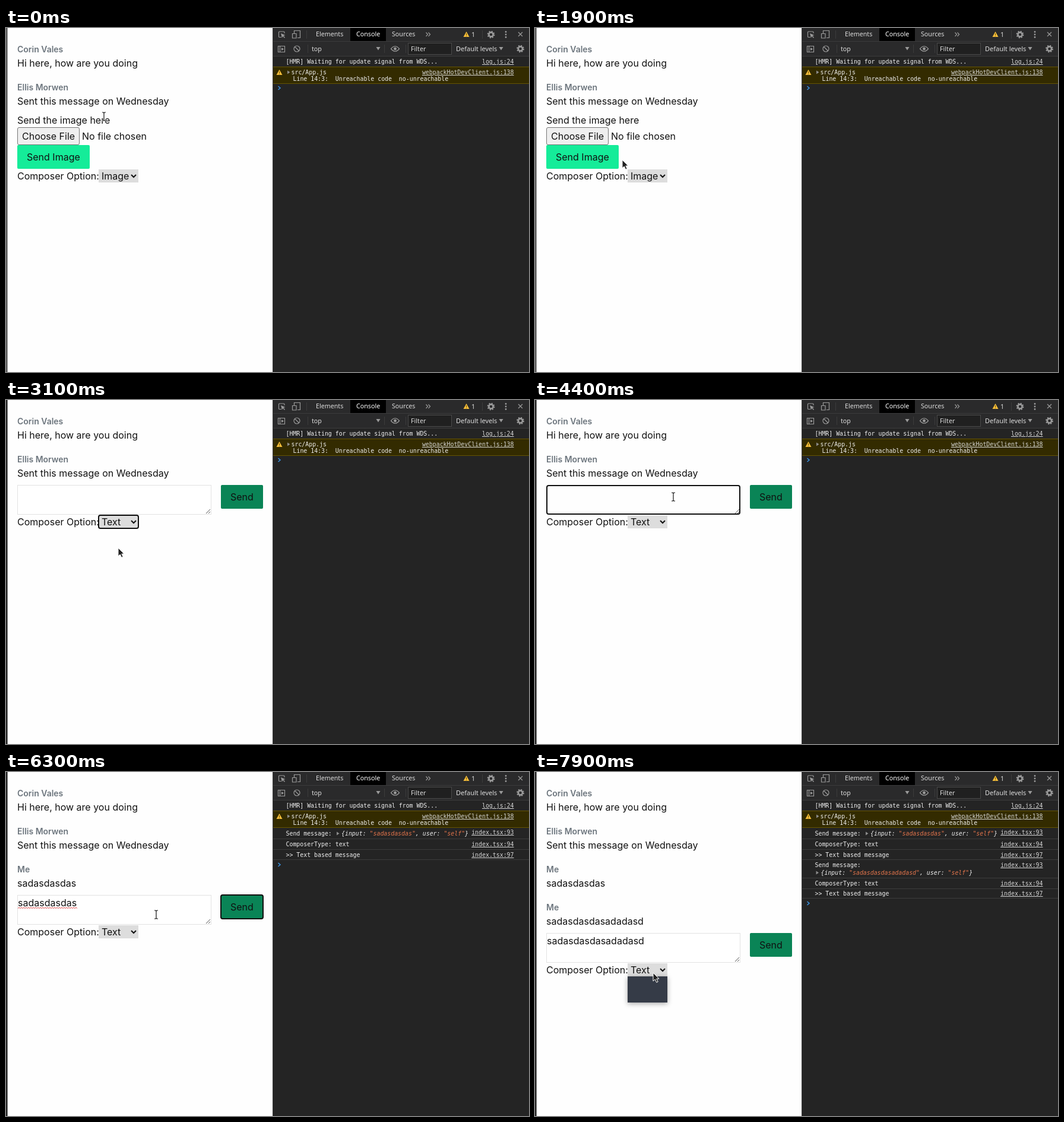
Animation of 881x579 px, one loop 8 s. Source, as an HTML page:

```html
<!DOCTYPE html>
<html lang="en">
<head>
<meta charset="utf-8">
<title>Message composer</title>
<style>
html, body { margin: 0; width: 100%; height: 100%; overflow: hidden; background: #fefefe; }
svg { display: block; }
text { white-space: pre; }
.app { font: 16px Inter, sans-serif; fill: #111; }
.name { font-size: 14px; font-weight: 600; fill: #6c757d; }
.ui { font: 10.7px "Noto Sans", sans-serif; fill: #dcdcdc; }
.log { font: 9.9px "DejaVu Sans Mono", monospace; fill: #efefef; }
.link { text-anchor: end; text-decoration: underline; fill: #d6d6d6; }
.obj { font-style: italic; }
.str { fill: #e2744b; }
.icon { fill: none; stroke: #9a9a9a; stroke-width: 1.2; }
.fill { fill: #9a9a9a; stroke: none; }
.rule { stroke: #3c3c3c; fill: none; }
.ring { fill: none; stroke: #101010; stroke-width: 2; }
</style>
</head>
<body>
<svg width="881" height="579" viewBox="0 0 881 579">
  <defs>
    <filter id="shadow" x="-50%" y="-50%" width="200%" height="200%">
      <feDropShadow dx="0" dy="2" stdDeviation="4" flood-opacity=".35"/>
    </filter>
    <g id="gear" class="icon">
      <circle r="3.6" stroke-width="2.6"/>
      <circle r="5.4" stroke-width="2" stroke-dasharray="2.12"/>
    </g>
    <g id="warn">
      <path d="M0-4.5L5 4.5H-5Z" fill="#f5bd3a"/>
      <path d="M0-1.5V1.5M0 2.5V3.5" stroke="#5a4500"/>
    </g>
    <path id="down" class="fill" d="M-3.5-2.5H3.5L0 3Z"/>
    <path id="right" d="M0-3L4.5 0L0 3Z" fill="#8c8c8c"/>
    <path id="arrow" d="M0 0V14L3.3 11L5.7 16.2L8.2 15L5.8 10H10Z" fill="#222" stroke="#fff"/>
    <g id="beam" fill="none">
      <path d="M-3-7H-1L0-6L1-7H3M0-6V6M-3 7H-1L0 6L1 7H3" stroke="#fff" stroke-width="2.6"/>
      <path d="M-3-7H-1L0-6L1-7H3M0-6V6M-3 7H-1L0 6L1 7H3" stroke="#111" stroke-width="1.2"/>
    </g>
    <path id="hand" stroke="#222" fill="#fff" stroke-linejoin="round"
      d="M-1.5 0.5Q0-1 1.5 0.5V6Q3 4.8 4.2 6.3Q5.8 5.4 6.8 7Q9 6.4 9 8.5V12.5L7.5 17H-1L-5 10.5Q-4.5 8.3-1.5 10.5Z"/>
  </defs>

  <rect x="449" width="432" height="579" fill="#242424"/>
  <rect x="450" width="431" height="47" fill="#2a2a2b"/>
  <rect x="580" width="60" height="22" fill="#000"/>
  <path class="rule" d="M449.5 0V579M450 22.5H881M450 47.5H881M506.5 4V18M802.5 4V18M508.5 28V42M637.5 28V42M673.5 28V42"/>
  <rect x="450" y="66" width="431" height="27" fill="#332b00"/>
  <path d="M450 65.5H881M450 93.5H881" stroke="#655300"/>

  <path class="icon" d="M464 15.5H460.5Q459.5 15.5 459.5 14.5V7Q459.5 6 460.5 6H468Q469 6 469 7V9"/>
  <path class="fill" d="M463 9L470.5 12L467.5 13L470 16L469 17L466.5 14L465 16.5Z"/>
  <path class="icon" d="M485.5 9V4.5H495.5V16.5H491M482.5 9.5H489V17H482.5Z"/>
  <path class="icon" d="M707.5 7.5L710.5 10.8L707.5 14M711.5 7.5L714.5 10.8L711.5 14"/>
  <path class="icon" stroke-width="1.5" d="M863 7L870 14M870 7L863 14"/>
  <g class="fill"><circle cx="842" cy="6.5" r="1.4"/><circle cx="842" cy="11" r="1.4"/><circle cx="842" cy="15.5" r="1.4"/></g>
  <path class="icon" d="M458.5 30.5H469.5V40.5H458.5ZM461.5 30V41"/>
  <path class="fill" d="M464 33L468 35.5L464 38Z"/>
  <path class="icon" stroke-width="1.5" d="M486.5 31.5L493.5 38.5M495 35A5 5 0 1 1 485 35A5 5 0 1 1 495 35"/>
  <path class="icon" d="M648.5 35Q655.5 26.5 662.5 35Q655.5 43.5 648.5 35Z"/>
  <circle class="fill" cx="655.5" cy="35" r="2.4"/>
  <rect x="677.5" y="25.5" width="73" height="19" fill="#202020" stroke="#4a4a4a"/>
  <use href="#gear" x="817" y="11"/><use href="#gear" x="866.5" y="35"/>
  <use href="#warn" x="775.5" y="10.5"/><use href="#warn" x="460.5" y="74.5"/>
  <use href="#down" x="627" y="34.5"/><use href="#down" x="834" y="34.5"/>
  <use href="#right" x="474" y="74.5"/>

  <g class="ui">
    <text x="522" y="14">Elements</text><text x="590" y="14" fill="#fff">Console</text>
    <text x="650" y="14">Sources</text><text x="784" y="15">1</text>
    <text x="515" y="39">top</text><text x="682" y="39">Filter</text>
    <text x="758" y="39" font-size="11">Default levels</text>
  </g>
  <g class="log">
    <text x="471.5" y="60">[HMR] Waiting for update signal from WDS...</text>
    <text class="link" x="855.5" y="60">log.js:24</text>
    <text x="480.5" y="78">src/App.js</text>
    <text class="link" x="855.5" y="78">webpackHotDevClient.js:138</text>
    <text x="483.5" y="89">Line 14:3:  Unreachable code  no-unreachable</text>
  </g>
  <g id="live"></g>
</svg>
<script>
const LOOP = 8000, STEP = 100;
const FIRST = "sadasdasdas", SECOND = FIRST + "adadasd";
const live = document.getElementById("live");

// pointer path: time, x, y
const path = [
  [0, 165, 149], [100, 165, 149], [200, 165, 150], [300, 165, 150],
  [800, 110, 178], [1200, 95, 214], [1500, 108, 188], [1900, 147, 222],
  [2200, 147, 222], [2500, 190, 249], [2700, 190, 249], [2900, 188, 271],
  [3100, 189, 249], [3600, 189, 249], [4200, 233, 163], [5000, 233, 163],
  [5200, 383, 167], [5400, 383, 167], [6300, 253, 240], [6700, 253, 240],
  [7000, 385, 232], [7200, 385, 232], [7800, 199, 338], [LOOP, 199, 338]
];

function pointer(t) {
  const i = path.findIndex(p => p[0] > t);
  const [t0, x0, y0] = path[i - 1], [t1, x1, y1] = path[i];
  const k = (t - t0) / (t1 - t0), e = k * k * (3 - 2 * k);
  return [x0 + (x1 - x0) * e, y0 + (y1 - y0) * e];
}

const during = (t, a, b) => t >= a && t < b;
const inside = ([px, py], x, y, w, h) => px >= x && px < x + w && py >= y && py < y + h;
const text = (x, y, s, cls = "") => `<text x="${x}" y="${y}" class="${cls}">${s}</text>`;
const rect = (x, y, w, h, attrs) => `<rect x="${x}" y="${y}" width="${w}" height="${h}" ${attrs}/>`;
const use = (id, x, y) => `<use href="#${id}" x="${x}" y="${y}"/>`;
const ring = (x, y, w, h) => rect(x, y, w, h, 'rx="3" class="ring"');
const link = (y, line) => text(855.5, y, "index.tsx:" + line, "link");
const rule = y => `<path class="rule" d="M450 ${y}.5H881"/>`;

function typed(t) {
  if (t < 6400) return FIRST.slice(0, Math.max(0, Math.floor((t - 4500) / 45)));
  return SECOND.slice(0, FIRST.length + Math.floor((t - 6400) / 55));
}

function object(x, y, input) {
  const str = s => `<tspan class="str">"${s}"</tspan>`;
  return use("right", x - 8, y - 3.5) +
    text(x, y, `{input: ${str(input)}, user: ${str("self")}}`, "obj");
}

// rows shared by both console entries, starting at the "ComposerType" baseline
function logTail(y, gap) {
  return text(471.5, y, "ComposerType: text") + link(y, 94) + rule(y + 5) +
    text(471.5, y + gap, "&gt;&gt; Text based message") + link(y + gap, 97) + rule(y + gap + 4);
}

function consoleLog(sent) {
  let s = "";
  if (sent > 0) s += text(471.5, 107, "Send message:") + object(565, 107, FIRST) + link(105, 93) + rule(112) + logTail(125, 18);
  if (sent > 1) s += text(471.5, 160, "Send message:") + link(160, 93) + object(481.5, 173, SECOND) + rule(178) + logTail(191, 17);
  const y = [101, 156, 221][sent];
  return `<g class="log">${s}</g><path d="M458.5 ${y - 3}L462 ${y}L458.5 ${y + 3}" fill="none" stroke="#3a95e8" stroke-width="1.5"/>`;
}

function messages(sent) {
  const list = [["Corin Vales", "Hi here, how are you doing"], ["Ellis Morwen", "Sent this message on Wednesday"],
    ["Me", FIRST], ["Me", SECOND]];
  return list.slice(0, 2 + sent).map(([who, body], i) =>
    text(19, 41 + 64 * i, who, "name") + text(19, 65 + 64 * i, body)).join("");
}

function imageForm(p) {
  const hover = inside(p, 19, 167, 105, 30);
  return text(19, 161, "Send the image here") +
    rect(19.5, 167.5, 104, 29, `rx="2.5" fill="${hover ? "#e2e2e2" : "#efefef"}" stroke="#767676"`) +
    text(27, 188, "Choose File") + text(128, 188, "No file chosen") +
    rect(19, 197, 122, 40, 'rx="2" fill="#15ec99"') + text(35, 223, "Send Image");
}

function textForm(t, y) {
  const writing = during(t, 4300, 5200) || during(t, 6400, 7100);
  const pressed = during(t, 5200, 6400) || during(t, 7100, 7800);
  let s = writing ? ring(20, y + 1, 325, 48)
    : rect(19.5, y + .5, 326, 49, 'fill="#fff" stroke="#e2e2e2"');
  s += `<path d="M337 ${y + 48}L344 ${y + 41}M341 ${y + 48}L344 ${y + 45}" stroke="#555"/>`;
  s += text(20, y + 19, typed(t));
  if (during(t, 5600, 6400))
    s += `<path d="M20 ${y + 22.5}${"l2-1.5 2 1.5".repeat(25)}" fill="none" stroke="#d33" stroke-width=".9"/>`;
  s += rect(362, y, 71, 40, 'rx="2" fill="#0a8456"') + text(378, y + 26, "Send");
  return s + (pressed ? ring(362, y, 71, 40) : "");
}

function select(t, y, value) {
  return text(19, y + 17, "Composer Option:") + rect(156, y, 67, 22, 'fill="#ddd"') +
    text(161, y + 17, value) +
    `<path d="M211 ${y + 9}l4 4 4-4" fill="none" stroke="#111" stroke-width="2"/>` +
    (during(t, 2900, 4300) ? ring(156, y, 67, 22) : "");
}

function popup(t, y, p) {
  let s = rect(156, y, 67, 44, 'fill="#353a47" filter="url(#shadow)"');
  if (t === 2500 || t >= 7900) return s;
  ["Text", "Image"].forEach((label, i) => {
    const top = y + 22 * i;
    const on = p[1] < y ? label === "Image" : inside(p, 156, top, 67, 22);
    if (on) s += rect(156, top, 67, 22, 'fill="#5294e2"');
    s += `<g fill="#e8eaee">${text(161, top + 17, label)}</g>`;
  });
  return s;
}

function cursor(p, image, y) {
  const button = image ? inside(p, 19, 197, 122, 40) : inside(p, 362, y, 71, 40);
  const editable = image ? inside(p, 19, 146, 157, 20) : inside(p, 19, y, 327, 50);
  return use(button ? "hand" : editable ? "beam" : "arrow", p[0].toFixed(1), p[1].toFixed(1));
}

function scene(t) {
  const p = pointer(t), image = t < 2900;
  const sent = (t >= 5400) + (t >= 7200);
  const y = 143 + 64 * sent, selectY = image ? 238 : y + 51;
  const open = during(t, 2500, 2900) || t >= 7900;
  return rect(0, 0, 2.6, 579, `fill="${t < 2300 ? "#5c5c5c" : "#262626"}"`) +
    `<g class="app">${messages(sent)}${image ? imageForm(p) : textForm(t, y)}` +
    select(t, selectY, image ? "Image" : "Text") +
    (open ? popup(t, selectY + 22, p) : "") + "</g>" +
    consoleLog(sent) + cursor(p, image, y);
}

let last = -1;
function frame() {
  const t = Math.floor(performance.now() % LOOP / STEP) * STEP;
  if (t !== last) live.innerHTML = scene(last = t);
  requestAnimationFrame(frame);
}
frame();
</script>
</body>
</html>
```
